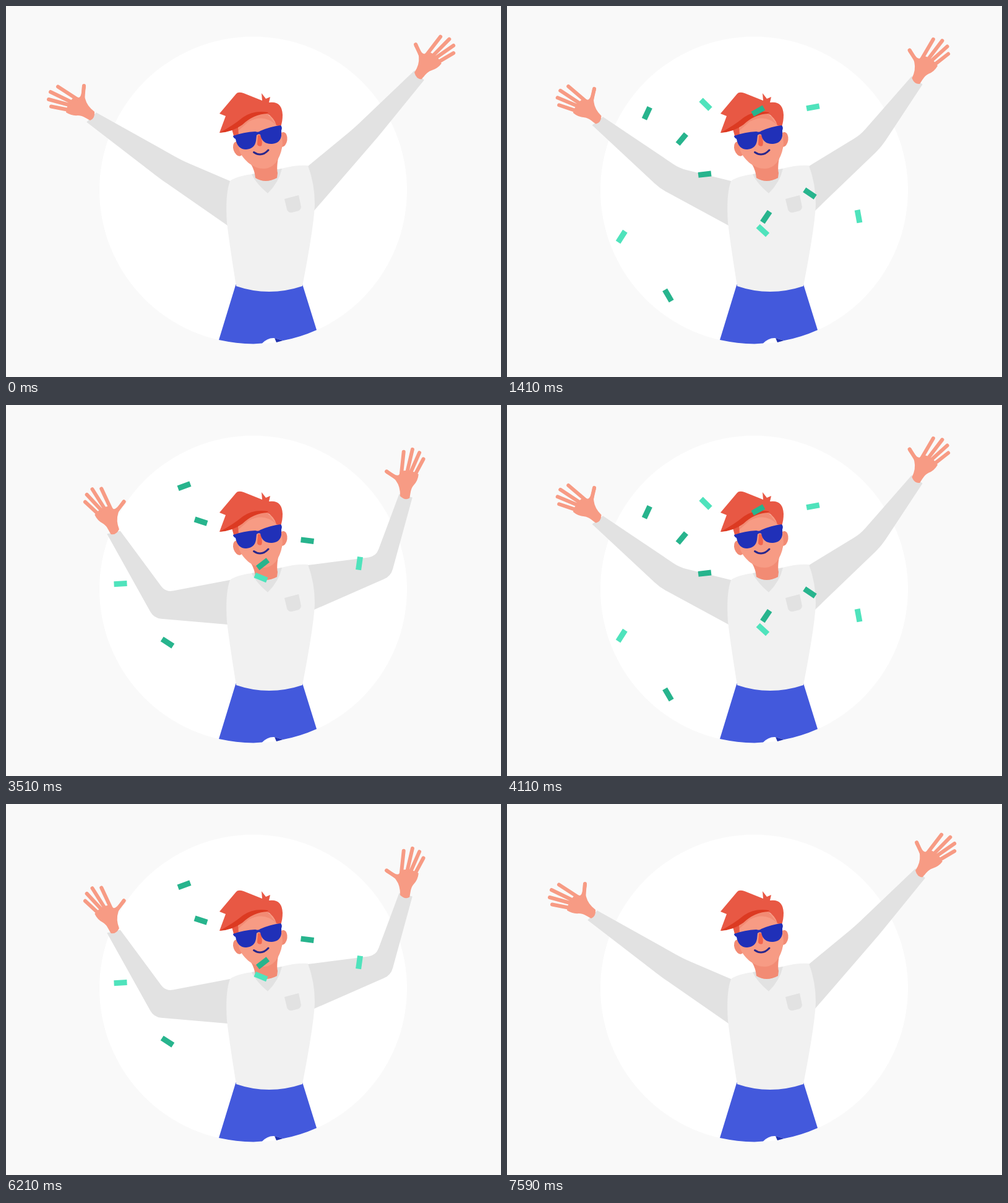
Write an HTML page that moves like this. It is 800 by 600 pixels and loops after 8100 ms.

```html
<!DOCTYPE html>
<html lang="en">
<head>
<meta charset="utf-8">
<title>Celebration</title>
<style>
html, body { margin: 0; width: 100%; height: 100%; overflow: hidden; background: #f9f9f9; }
svg { display: block; width: 100vw; height: 100vh; }
</style>
</head>
<body>
<svg viewBox="0 0 800 600">
  <defs>
    <g id="hand">
      <path fill="#f79b84" d="M136 185C128 181 124 177 116 177Q106 178 97 172Q98 158 110 147L118 148Q123 146 123 128L129 130Q126 146 128 150Q131 162 143 171Q144 182 136 185Z"/>
      <path fill="none" stroke="#f79b84" stroke-width="6" stroke-linecap="round" d="M73 162.500L101 168M69 151L102 160M72 139L105 155M84 130.500L114 150M126 129L124 150"/>
    </g>
  </defs>
  <circle cx="399.5" cy="298" r="248.5" fill="#fff"/>

  <g id="arms" fill="#e2e2e2"></g>
  <g id="leftHand"><use href="#hand"/></g>
  <g id="rightHand"><use href="#hand" transform="matrix(-.943 .334 .334 .943 737.8 -101.5)"/></g>

  <!-- shorts and shirt -->
  <path fill="#4359dc" d="M371.500 450L344 540Q372 546 400 546.500L414 545.500Q423 536 434 537L448 541Q475 536 502 524L479 450Z"/>
  <path fill="#2133b0" d="M434 537L448 541L437 544Z"/>
  <path fill="#f1f1f1" d="M362 283Q373 275 398 272L445 263Q468 257 488 258Q499 288 499 320Q498 355 479 453Q425 471 372 453Q361 385 357 350Q354 305 362 283Z"/>
  <path fill="#e2e2e2" d="M397 272Q404 287 423 303Q441 285 446 263ZM450 312L473 306L477 325Q476 331 470 332L462 334Q456 335 454 329Z"/>

  <!-- head -->
  <path fill="#f28b74" d="M396 256Q402 266 403 278Q419 288 438 278L439 270Q437 262 440 245Z"/>
  <g fill="#f28b74">
    <ellipse cx="375" cy="231" rx="7.500" ry="12" transform="rotate(-18 375 231)"/>
    <ellipse cx="447" cy="216" rx="7.500" ry="12" transform="rotate(8 447 216)"/>
  </g>
  <path fill="#f79b84" d="M369 195L377 234Q381 244 391 253Q404 264 418 263Q431 262 439 249Q446 236 447 222L443 182L400 170Z"/>
  <path fill="#f28b74" d="M374 203Q382 176 422 173L438 194Q418 173 392 187Z"/>
  <path fill="#e85844" d="M365 199L375 194L376 210L368 210Z"/>
  <path fill="#e85844" d="M345 205L355 178L345 174L372 142Q375 138 384 141L414 153L413 141L420 150L427 147L425 156Q446 153 447 176Q447 187 444 195L437 193Q434 181 422 174Q400 174 382 191Q365 203 345 205Z"/>
  <path fill="#dc3a22" d="M345 205Q366 194 383 180Q400 168 424 172L422 174Q400 175 382 192Q366 204 345 205Z"/>
  <path fill="#f2644c" d="M407 209L412 209Q415 222 413 226Q408 228 406 224Z"/>
  <path fill="#2030b8" d="M367 210Q384 204 403 203Q408 205 411 202Q427 195 444 193Q447 196 445 201L445 210Q443 222 430 223Q414 224 411 208Q408 206 405 209L404 218Q402 231 388 232Q374 232 371 215Q367 213 367 210Z"/>
  <path fill="none" stroke="#29278c" stroke-width="3" stroke-linecap="round" d="M400.500 236.500Q413 245 424 233"/>

  <g id="confetti"></g>
</svg>
<script>
const LOOP = 2700, WAVE = 1680, MIDDLE = 810, FALL = 0.14, FADE = 120, CUFF = 11;
const $ = id => document.getElementById(id);

function add(parent, tag, attributes = {}) {
  const node = document.createElementNS("http://www.w3.org/2000/svg", tag);
  for (const key in attributes) node.setAttribute(key, attributes[key]);
  return parent.appendChild(node);
}

const mix = (a, b, p) => a.map((v, i) => v + (b[i] - v) * p);
const toward = (a, b, r) => mix(a, b, r / Math.hypot(b[0] - a[0], b[1] - a[1]));

// Shoulders are fixed; each other joint goes from its raised to its bent place.
const arms = [
  {
    hand: $("leftHand"), shoulder: [[362, 283], [358, 355]],
    top: [[285, 250], [258, 303]], bottom: [[250, 280], [239, 345]],
    wrist: [[138, 180], [174, 206]], cuff: 135, turn: 32
  },
  {
    hand: $("rightHand"), shoulder: [[488, 259], [498, 331]],
    top: [[563, 197], [598, 245]], bottom: [[600, 213], [622, 277]],
    wrist: [[668, 112], [646, 147]], cuff: 45, turn: -31.5
  }
];
for (const arm of arms) arm.sleeve = add($("arms"), "path");

function poseArm({ hand, sleeve, shoulder, top, bottom, wrist, cuff, turn }, p) {
  const [upper, lower, [x, y]] = [top, bottom, wrist].map(([a, b]) => mix(a, b, p));
  const angle = (cuff + turn * p) * Math.PI / 180;
  const dx = CUFF * Math.cos(angle), dy = CUFF * Math.sin(angle);
  const near = [x - dx, y - dy], far = [x + dx, y + dy];
  const bend = (from, at, to) => `L${toward(at, from, 12)}Q${at} ${toward(at, to, 12)}`;

  sleeve.setAttribute("d", `M${shoulder[0]}${bend(shoulder[0], upper, near)}L${near}L${far}`
    + `${bend(far, lower, shoulder[1])}L${shoulder[1]}Z`);
  hand.setAttribute("transform",
    `translate(${x - wrist[0][0]} ${y - wrist[0][1]}) rotate(${turn * p} ${wrist[0]})`);
}

let seed = 7;
const random = (low, high) => {
  seed = seed * 16807 % 2147483647;
  return low + (high - low) * seed / 2147483647;
};

// x, y and angle at MIDDLE; the last three of the first burst are light
const burst = [
  [288, 131, -20], [315, 188, 18], [487, 219, 7], [415, 257, -38],
  [261, 384, 33], [185, 289, -3], [412, 279, 22], [571, 256, 98]
];

function makePiece([x, y, angle], light, born, gone) {
  const node = add($("confetti"), "rect",
    { x: -10.5, y: -4.5, width: 21, height: 9, fill: light ? "#4fe3bc" : "#27b48d" });
  return { node, x, y, angle, born, gone, spin: random(-0.12, 0.12), drift: random(-0.015, 0.015) };
}

const pieces = burst.map((place, i) => makePiece(place, i > 4, random(60, 500), random(1850, 2150)));
for (let i = 0; i < 4; i++) {
  const place = [230 + 90 * i, random(60, 95), random(-45, 45)];
  pieces.push(makePiece(place, i % 2, 880 + 120 * i, 2180));
}

function draw(now) {
  const t = now % LOOP, d = t - MIDDLE;
  const bent = t < WAVE ? (1 - Math.cos(2 * Math.PI * t / WAVE)) / 2 : 0;
  for (const arm of arms) poseArm(arm, bent);

  for (const { node, x, y, angle, born, gone, spin, drift } of pieces) {
    const alpha = Math.min((t - born) / FADE, (gone - t) / FADE, 1);
    node.setAttribute("opacity", Math.max(0, alpha));
    node.setAttribute("transform",
      `translate(${x + drift * d} ${y + FALL * d}) rotate(${angle + spin * d})`);
  }
}

function tick() {
  draw(performance.now());
  requestAnimationFrame(tick);
}
tick();
</script>
</body>
</html>
```
